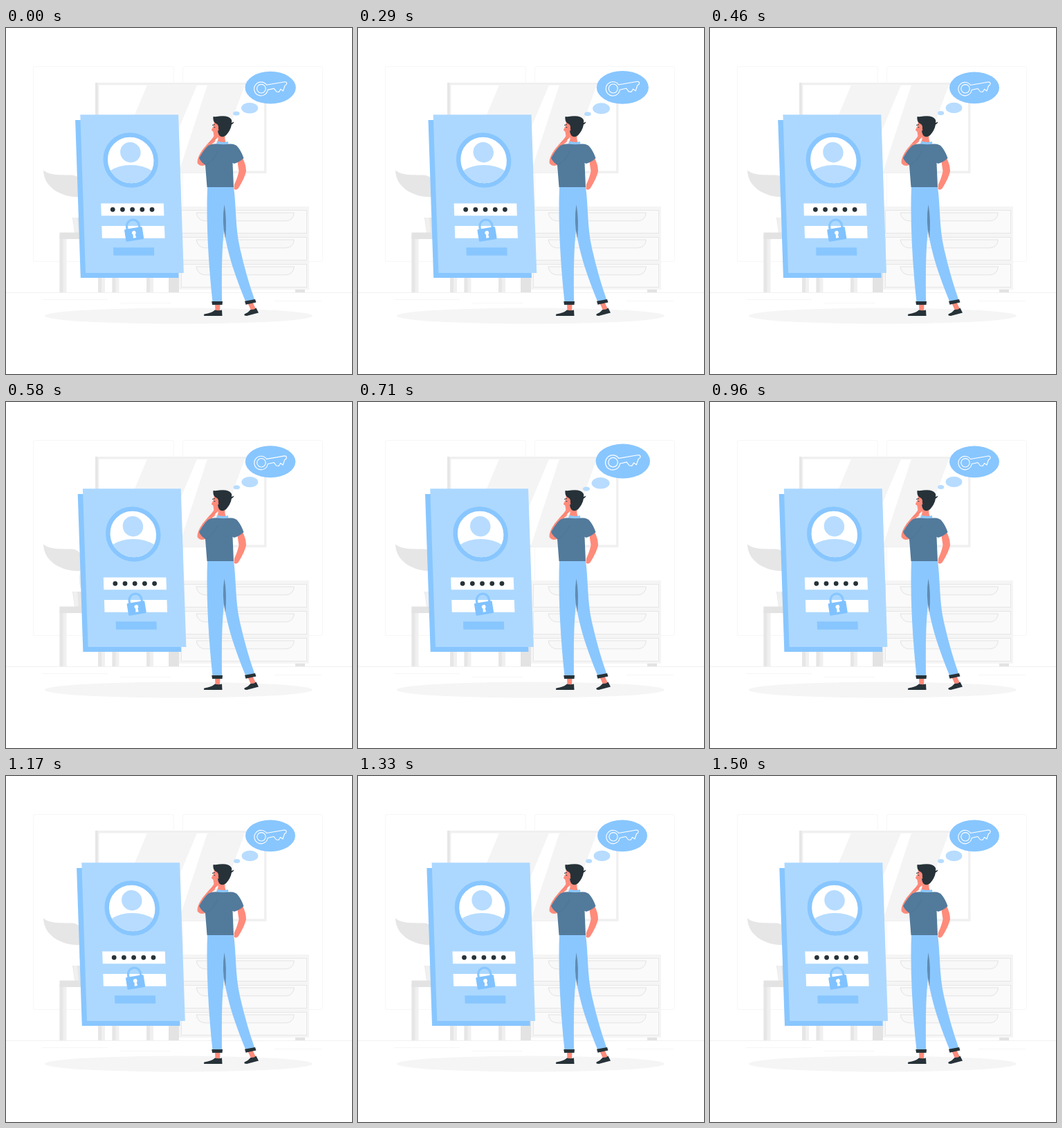
Animation of 500x500 px, one loop 1.54 s. Source, as an HTML page:

```html
<!DOCTYPE html>
<html lang="en">
<head>
<meta charset="utf-8">
<title>Forgotten password</title>
<style>
  html, body { margin: 0; width: 100%; height: 100%; overflow: hidden; background: #fff; }
  svg { display: block; width: 100vw; height: 100vh; }
</style>
</head>
<body>
<svg viewBox="0 0 500 500">
  <defs>
    <g id="drawer">
      <rect x="253.500" y="263.500" width="181" height="33" fill="#fafafa" stroke="#e6e6e6"/>
      <path d="M275 267H416.500Q415 278 405 278.800H287Q277 278 275 267Z" fill="#f8f8f8" stroke="#e3e3e3"/>
    </g>
    <g id="leg">
      <path d="M0 300H10V382H0Z" fill="#f0f0f0"/>
      <path d="M0 300H5V382H0Z" fill="#e6e6e6"/>
    </g>
    <clipPath id="face"><circle r="33.300"/></clipPath>
  </defs>

  <!-- room -->
  <g fill="none" stroke="#f6f6f6">
    <rect x="39.500" y="55.500" width="203" height="282" rx="3"/>
    <rect x="255.500" y="55.500" width="202" height="282" rx="3"/>
  </g>
  <path d="M0 382.500H500" stroke="#ebebeb" stroke-width=".7"/>
  <path d="M52 392.500H147M165 397.500H238M388 394.500H456" stroke="#f3f3f3" stroke-width=".7"/>

  <rect x="129" y="79" width="247.500" height="131" rx="1.500" fill="#f0f0f0"/>
  <path d="M129 79H132.500V210H129Z" fill="#e6e6e6"/>
  <path d="M134.500 82.500H373V206.500H134.500Z" fill="#fff"/>
  <path d="M204 82.500H276L224 206.500H152ZM291 82.500H345L299 209H250.500V206Z" fill="#f4f4f4"/>

  <path d="M54 205.500C64 214 82 212 95 212.500Q104 213 108 220V244C90 246 55 236 54 205.500Z" fill="#e6e6e6"/>
  <path d="M109 240Q103 255 108 270H112V240Z" fill="#ededed"/>
  <path d="M96 274H125L122 296H99Z" fill="#e6e6e6"/>
  <path d="M97 274H103L105 296H99Z" fill="#f0f0f0"/>
  <use href="#leg" x="77.500"/>
  <use href="#leg" x="133"/>
  <use href="#leg" x="153.500"/>
  <use href="#leg" x="203"/>
  <path d="M77.500 295.500H214V305H77.500Z" fill="#e3e3e3"/>

  <path d="M235 258H250V382H235Z" fill="#e3e3e3"/>
  <path d="M418 378H432V382H418Z" fill="#e3e3e3"/>
  <path d="M250 258H438V378H250Z" fill="#f5f5f5"/>
  <use href="#drawer"/>
  <use href="#drawer" y="39"/>
  <use href="#drawer" y="78"/>

  <ellipse cx="249.500" cy="416" rx="193.500" ry="11.500" fill="#f5f5f5"/>

  <!-- card -->
  <g id="card">
    <path d="M100.300 133H242L249.700 361H108Z" fill="#88c6ff"/>
    <path d="M107.500 125.300H249.300L257 354H115.200Z" fill="#acd8ff"/>
    <g transform="translate(180.400 191) skewX(1.900)">
      <circle r="36.500" fill="#fff" stroke="#88c6ff" stroke-width="6.500"/>
      <ellipse cy="37" rx="44" ry="30" fill="#b7dcff" clip-path="url(#face)"/>
      <circle cy="-11.300" r="14.700" fill="#b7dcff"/>
    </g>
    <path d="M137.400 253.500H228L228.600 271.200H138ZM138.500 286H229.100L229.700 303.700H139.100Z" fill="#fff"/>
    <path d="M155.200 317.300H214.100L214.500 328.800H155.600Z" fill="#88c6ff"/>
    <path d="M154.400 262.300h57" stroke="#263238" stroke-width="6.800" stroke-linecap="round" stroke-dasharray="0 14.200"/>
    <g transform="translate(185.300 298) rotate(-9)">
      <path d="M-8.800 -8V-12A9 9 0 0 1 9.200 -12V-8" fill="none" stroke="#88c6ff" stroke-width="3.200"/>
      <rect x="-13" y="-9" width="26" height="18" rx="1.500" fill="#80c2ff"/>
      <circle cy="-2" r="2.900" fill="#fff"/>
      <path d="M-1.300 -1H1.300L2.200 5.500H-2.200Z" fill="#fff"/>
    </g>
  </g>

  <!-- thinker -->
  <path d="M302 399H309.500L309 409H302.500ZM349.500 398L356.500 396.500L361 406L354 408Z" fill="#ff8b7b"/>
  <path d="M302 407.500Q307 409 312 407.500L312.500 416H287Q285 415.500 286.500 413.500Q297 412 302 407.500Z
           M353.500 407Q358 407.500 361.500 404.500L365 411.500L348 416Q343.500 416 344.500 413.500Q350 411.500 353.500 407Z" fill="#263238"/>
  <path d="M291 229.500H329C333 258 331 287 338 318Q347 358 359.500 393.500L346.500 396C331 357 321 330 315 292C311 329 312 363 312 396H298.500C293 345 289 285 291 229.500Z" fill="#8ac7ff"/>
  <path d="M315.500 255Q311.500 281 317 304Q319.500 276 315.500 255Z" fill="#608bb3"/>
  <path d="M297.300 395H313L312.500 400H298ZM345 394.800L360 392L361.500 396.500L346.500 399.800Z" fill="#263238"/>

  <path d="M334 190L342 188Q347 198 347 207Q345 217 335.500 232Q332 235 329.500 232.500L330 226Q335 215 336.500 207Z" fill="#ff8b7b"/>
  <path d="M306 157Q301 163 302 164Q293 170 290 186L288 198Q280 201 276.500 195Q276 187 284 176Q292 166 297 161L302 154Z" fill="#ff8b7b"/>
  <path d="M306 152L317 150Q315 160 318 166Q312 171 304.500 166Q308 160 306 152Z" fill="#ff8b7b"/>
  <path d="M301 134L309 133V157Q304 160.500 300.500 157L299.500 150L296.800 147.500L300 141Z" fill="#ff8b7b"/>
  <path d="M298 140.500L302 139.500" stroke="#263238" stroke-width="1"/>
  <circle cx="301.500" cy="143.500" r=".8" fill="#263238"/>
  <path d="M299.500 128Q303 128.500 308 127.500Q322 126 325.500 132Q327 134 326 137L329.500 135.500Q329 138 326 139.500Q324.500 148 318 155Q312 159.500 308 155Q305 150 307 144Q307 139 303 138Q298.500 135 299.500 128Z" fill="#263238"/>
  <path d="M306 143Q303 141.500 303.500 145Q304.500 148.500 307.500 148Z" fill="#ff8b7b"/>
  <path d="M305.500 163.500Q313 166 321 164L321.500 169H303.500Z" fill="#8ac7ff"/>
  <path d="M303.500 167.500Q315 169 324 167.500Q332 167.500 335 172Q340 178 343.500 188Q338 193.500 330 196L327.500 195L329 230H290.500L288 198Q282 194 279 188Q285 177 292 170Q297 167 303.500 167.500Z" fill="#527a9b"/>
  <path d="M289.500 198Q301 190 306 178" fill="none" stroke="#48708f" stroke-width=".6"/>
  <path d="M294 166Q299 160 305 159" fill="none" stroke="#e5715f" stroke-width=".7"/>

  <!-- thought -->
  <g id="thought">
    <ellipse cx="333.600" cy="123" rx="4.600" ry="2.900" fill="#b7dcff"/>
    <ellipse cx="352.500" cy="115.400" rx="11.900" ry="7.600" fill="#b7dcff"/>
    <ellipse cx="382" cy="86.300" rx="36" ry="22.900" fill="#88c6ff"/>
    <g fill="none" stroke="#fff" stroke-width="1.100" stroke-linejoin="round">
      <circle cx="369" cy="87.800" r="6.200"/>
      <path d="M376.500 82.500L402.500 78Q405 78 405.200 80.500Q405 82.500 402.500 83.500L400 91L396.500 88.500L394 92.500L390.500 92L387 87.500L378.200 89.500A9.700 9.700 0 1 1 376.500 82.500Z"/>
    </g>
  </g>
</svg>
<script>
  const LOOP = 1540, FRAMES = 37, CYCLE = 1500, LEAD = 28;
  // [time in ms, value]
  const shake = [[0, 0], [150, -1], [300, 2], [450, -4], [600, 4], [750, -4],
                 [900, 4], [1050, -4], [1200, 2], [1350, -1], [1500, 0]];
  const beat = [[0, 1], [150, 1.1], [450, 1], [600, 1], [750, 1.1], [900, 1], [1500, 1]];

  const card = document.getElementById('card');
  const thought = document.getElementById('thought');

  function at(keys, t) {
    const i = Math.max(1, keys.findIndex(k => k[0] >= t));
    const [t0, a] = keys[i - 1], [t1, b] = keys[i];
    return a + (b - a) * (t - t0) / (t1 - t0);
  }

  function draw(ms) {
    const step = Math.floor((ms % LOOP + 4) * FRAMES / LOOP) % FRAMES;
    const t = Math.min(step * 1000 / 24 + LEAD, CYCLE);
    card.setAttribute('transform', `translate(${at(shake, t)} 0)`);
    thought.setAttribute('transform',
      `translate(373.5 94.7) scale(${at(beat, t)}) translate(-373.5 -94.7)`);
  }

  const start = performance.now();
  function tick(now) {
    draw(Math.max(0, now - start));
    requestAnimationFrame(tick);
  }
  draw(0);
  requestAnimationFrame(tick);
</script>
</body>
</html>
```
